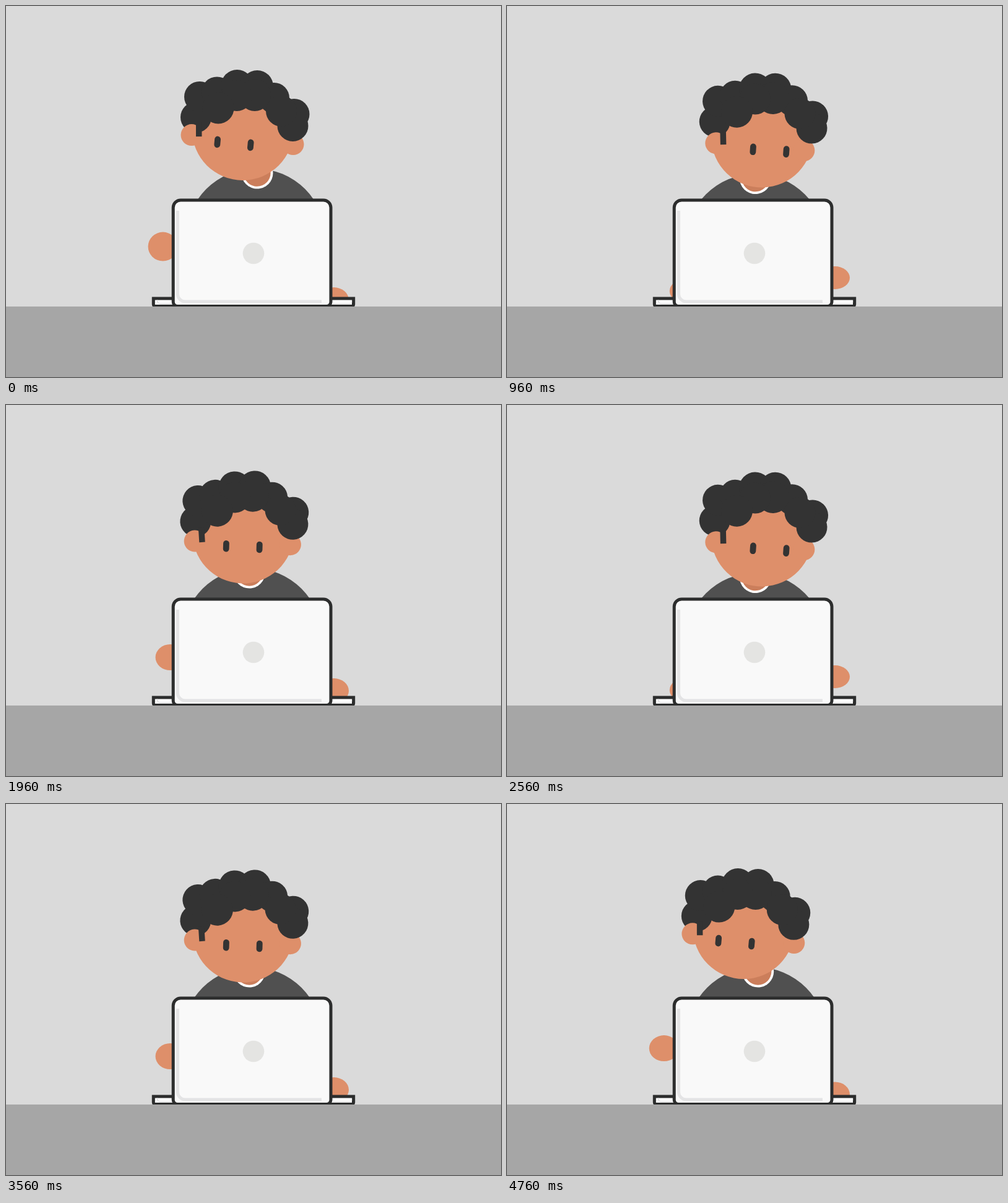
An HTML page with a canvas for the animation above (4.8 s loop, 800 by 600 pixels).

```html
<!DOCTYPE html>
<html lang="en">
<head>
<meta charset="utf-8">
<title>Typing at a laptop</title>
<style>
html, body { margin: 0; width: 100%; height: 100%; overflow: hidden; background: #dadada; }
canvas { display: block; width: 800px; height: 600px; }
</style>
</head>
<body>
<canvas id="stage" width="800" height="600"></canvas>
<script>
const ctx = document.getElementById('stage').getContext('2d');
const CYCLE = 1600, STEP = 40;
const SKIN = '#de8f6a', NECK = '#cb7e5b', HAIR = '#333333', SHIRT = '#505050';
const INK = '#2c2d2d', SHADE = '#e4e4e5';
const RAD = Math.PI / 180;

// Head parts are placed around this point, in the leftmost pose.
const HEAD = { x: 389.2, y: 161 };
const CURLS = [
  [307, 180, 25], [313, 147, 25], [341, 139.5, 25], [373.5, 129, 26], [406, 130, 26],
  [433, 149, 25], [465.5, 175, 25], [463.5, 194, 25], [445, 170, 25],
  [402, 144, 26], [373, 145, 25], [343, 165, 25.5]
];

function ellipse(x, y, rx, ry, color) {
  ctx.fillStyle = color;
  ctx.beginPath();
  ctx.ellipse(x, y, rx, ry, 0, 0, 2 * Math.PI);
  ctx.fill();
}

const circle = (x, y, r, color) => ellipse(x, y, r, r, color);

function box(x, y, w, h, radii, fill, stroke, width) {
  ctx.beginPath();
  ctx.roundRect(x, y, w, h, radii);
  if (fill) { ctx.fillStyle = fill; ctx.fill(); }
  if (stroke) { ctx.strokeStyle = stroke; ctx.lineWidth = width; ctx.stroke(); }
}

function shifted(dx, dy, draw) {
  ctx.save();
  ctx.translate(dx, dy);
  draw();
  ctx.restore();
}

// Rounded L-shaped shade: down the left side, then along the bottom.
function corner(left, top, right, bottom, radius, width) {
  ctx.strokeStyle = SHADE;
  ctx.lineWidth = width;
  ctx.beginPath();
  ctx.moveTo(left, top);
  ctx.arcTo(left, bottom, right, bottom, radius);
  ctx.lineTo(right, bottom);
  ctx.stroke();
}

function drawBody(c2, c4) {
  const drop = 4.7 * (1 - c4);
  circle(400.5 + 3 * c2, 376 + drop, 113, SHIRT);
  const x = 399.4 + 6.5 * c2, y = 270 + drop;
  for (const [r, color] of [[25.6, '#fff'], [21.8, NECK]]) {
    ctx.fillStyle = color;
    ctx.beginPath();
    ctx.arc(x, y, r, -0.2, Math.PI + 0.2);
    ctx.fill();
  }
}

function drawHands(c1, c2, c4, s4) {
  ellipse(270.6 - 19.2 * c1 + 2.2 * c2,
          432.3 - 6.8 * c2 - 36.4 * c4 + 2.2 * s4,
          24, 20 + 3.5 * c4 + 3.1 * s4, SKIN);
  const ry = 19.3 + c4;
  ellipse(530, 432.8 + 3.9 * c2 + 18.4 * c4 + 3.2 * s4 + ry, 24, ry, SKIN);
}

function drawHair() {
  ctx.fillStyle = HAIR;
  ctx.beginPath();
  for (const [x, y] of CURLS) ctx.lineTo(x, y);
  ctx.fill();
  for (const [x, y, r] of CURLS) circle(x, y, r, HAIR);
}

function drawEye(x, y) {
  ctx.save();
  ctx.translate(x, y);
  ctx.rotate(5.2 * RAD);
  box(-4.9, -9.3, 9.8, 18.6, 4.9, HAIR);
  ctx.restore();
}

function drawHead(c1, c2, c4) {
  const turn = 1 - c1, lower = 3.4 * turn;
  ctx.save();
  ctx.translate(399.1 - 19.2 * c1 + 9.3 * c2, 165.5 + 3.3 * c1 - 2.7 * c2 - 5.2 * c4);
  ctx.rotate(1.8 * (c2 - 1) * RAD);
  ctx.translate(-HEAD.x, -HEAD.y);
  shifted(0, lower, () => circle(382.7, 200, 82, SKIN));
  shifted(-7.7 * turn, lower, () => circle(464, 223.7, 17.5, SKIN));
  drawHair();
  shifted(4.6 * turn, lower, () => {
    circle(300, 208.7, 17.5, SKIN);
    box(307, 188, 9.5, 23.2, 0, HAIR);
  });
  shifted(14.5 * turn, lower, () => {
    drawEye(341.7, 220);
    drawEye(395.3, 225);
  });
  ctx.restore();
}

function drawLaptop() {
  box(238.3, 473, 323.4, 12.5, [0, 0, 3, 3], '#fff', INK, 5);
  corner(244.5, 475.5, 268, 481.5, 5, 2);
  box(528, 480.5, 30, 2, 0, SHADE);
  box(559, 480, 3, 3, 0, INK);
  box(270.2, 314, 254.8, 171.5, [12, 12, 7, 7], '#f9f9f9', INK, 5);
  corner(277.5, 331, 510, 478, 12, 5);
  circle(400, 400, 17.3, '#e4e4e2');
}

function draw(time) {
  const phase = 2 * Math.PI * (time % CYCLE) / CYCLE;
  const c1 = Math.cos(phase), c2 = Math.cos(2 * phase);
  const c4 = Math.cos(4 * phase), s4 = Math.sin(4 * phase);
  box(0, 0, 800, 600, 0, '#dadada');
  drawBody(c2, c4);
  drawHead(c1, c2, c4);
  drawHands(c1, c2, c4, s4);
  drawLaptop();
  box(0, 486, 800, 114, 0, '#a6a6a6');
}

const start = performance.now();
function tick() {
  const elapsed = performance.now() - start;
  draw(Math.floor(elapsed / STEP) * STEP);
  requestAnimationFrame(tick);
}
tick();
</script>
</body>
</html>
```
